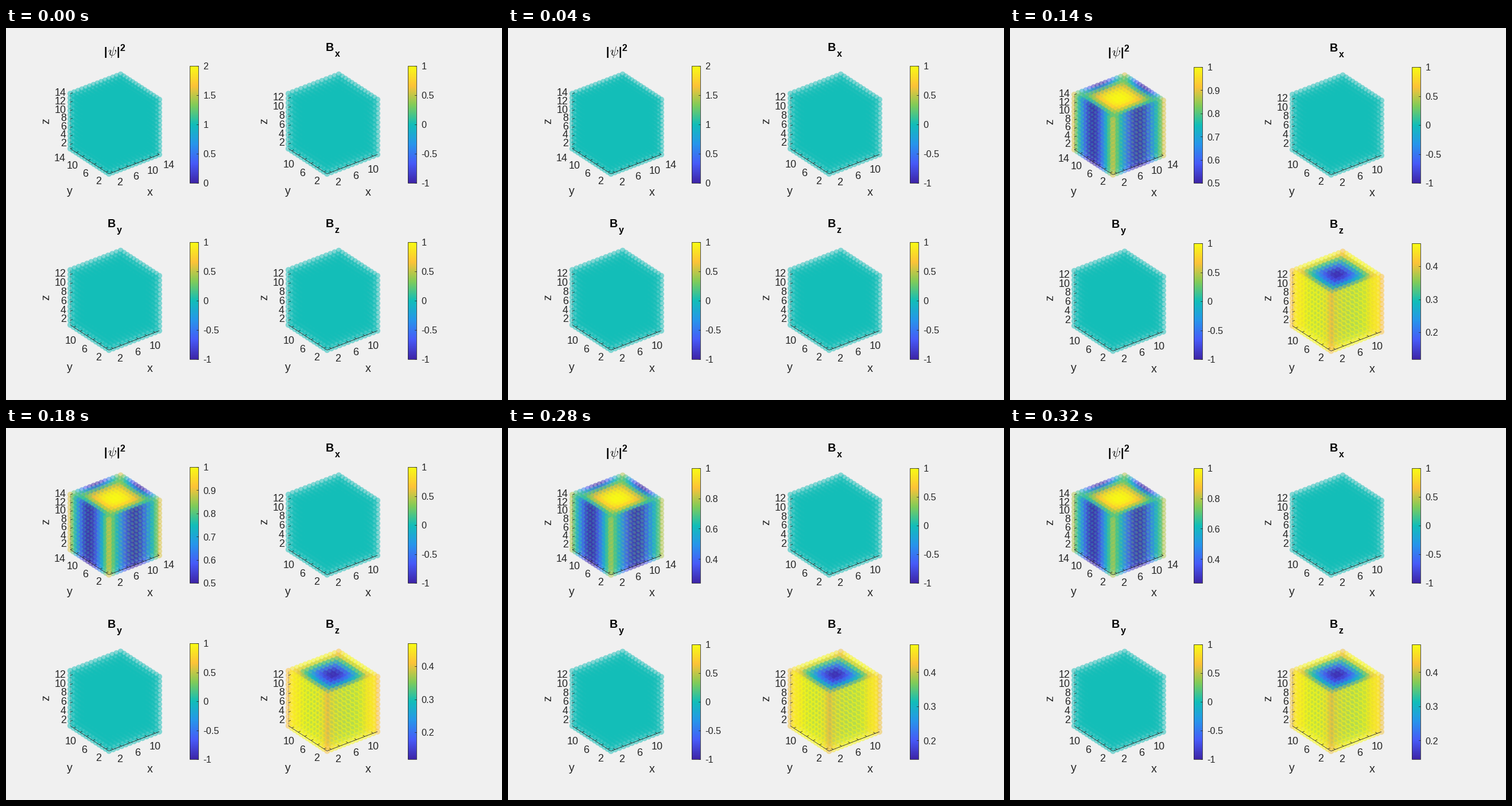
Write a matplotlib script that moves like this. It is 864 px wide and 648 px high and loops after 350 ms.

```python
import numpy as np
import matplotlib.pyplot as plt
from matplotlib.animation import FuncAnimation
from matplotlib.colors import LinearSegmentedColormap
from matplotlib.patches import Rectangle

W, H, DPI = 864, 648, 72
BG, GREY = "#f0f0f0", "#262626"
plt.rcParams["font.family"] = "Liberation Sans"
plt.rcParams["mathtext.fontset"] = "cm"

CMAP = LinearSegmentedColormap.from_list("scale", [
    "#3e26a8", "#475bf9", "#2796eb", "#12beb9", "#81cc59", "#fec338",
    "#f9fb15"])

# Orthographic view: screen vectors of the cube edges, front bottom corner
AZ, EL, EDGE = np.radians(37.5), np.radians(30), 110.5
EX = EDGE * np.array([np.cos(AZ), -np.sin(AZ) * np.sin(EL)])
EY = EDGE * np.array([-np.sin(AZ), -np.cos(AZ) * np.sin(EL)])
EZ = EDGE * np.array([0, -np.cos(EL)])
CORNER = np.array([179.3, 254])
RADIUS, ALPHA = 5.1, 0.5


def settle(step, rate, start, end):
    """Geometric approach to a steady state, beginning at step 1."""
    return end + (start - end) * rate ** max(step - 1, 0)


def lattice(n):
    """Grid indices of an n*n*n cube, farthest point first."""
    z, y, x = np.mgrid[:n, :n, :n].reshape(3, -1)
    nearness = (z * np.sin(EL)
                - np.cos(EL) * (x * np.sin(AZ) + y * np.cos(AZ)))
    order = np.argsort(nearness, kind="stable")
    return x[order], y[order], z[order]


GRIDS = {n: lattice(n) for n in (13, 14)}


def flat(n, step):
    return np.full(n ** 3, .5)


def density(n, step):
    x, y, _ = GRIDS[n]
    base = settle(step, .59, .075, .15)

    def wall(a, b):
        depth = np.minimum(a, n - 1 - a) * 2 / (n - 1)
        along = np.sin(np.pi * b / (n - 1))
        return (1 - depth) ** 3 * (base + (1 - base) * along)

    return np.clip(1 - wall(x, y) - wall(y, x), 0, 1)


def field_z(n, step):
    x, y, _ = GRIDS[n]
    sx, sy = (np.abs(np.sin(np.pi * a / (n - 1))) for a in (x, y))
    dip = np.minimum(sx, sy) * np.maximum(sx, sy) ** .3
    near = np.minimum(x, n - 1 - x) + np.minimum(y, n - 1 - y)
    corner = settle(step, .33, .12, .19) * np.exp(-near)
    return np.clip(1 - dip - corner, 0, 1)


fig = plt.figure(figsize=(W / DPI, H / DPI), dpi=DPI, facecolor=BG)
ax = fig.add_axes([0, 0, 1, 1])


def label(x, y, s, size=18, ha="center"):
    """Text whose digits are vertically centred on y."""
    ax.text(x, y + .36 * size, s, size=size, ha=ha, va="baseline",
            color=GREY)


def line(p, q, alpha):
    ax.plot([p[0], q[0]], [p[1], q[1]], color="black", lw=.8,
            solid_capstyle="butt", alpha=alpha, zorder=3)


def draw_cube(ox, oy, n, values, dy):
    origin = CORNER + (ox, oy + dy)
    unit = 1 / (n - 1)
    idx = np.array(GRIDS[n]).T * unit
    pts = origin + idx @ np.array([EX, EY, EZ])
    ax.scatter(pts[:, 0], pts[:, 1], s=(2 * RADIUS) ** 2, c=CMAP(values),
               alpha=ALPHA, linewidths=0, zorder=2)

    inner_x, inner_y = EX * .045, EY * .05
    line(origin, origin + EX, .85)
    line(origin, origin + EY, .75)
    line(origin + EY, origin + EY + EZ, .25)
    for v in range(2, n + 1, 2):
        t = (v - 1) * unit
        for p, d in ((origin + EX * t, inner_y), (origin + EY * t, inner_x),
                     (origin + EY + EZ * t, inner_x)):
            line(p, p + d, .8)
        label(ox + 105, oy + dy + 206.7 - 94.7 * t, str(v), ha="right")
    for v in range(2, n + 1, 4):
        t = (v - 2) * unit
        label(ox + 198 + 93 * t, oy + 267.6 - 32.7 * t + dy * .3, str(v))
        label(ox + 161 - 73 * t, oy + 266 - 44 * t + dy * .6, str(v))

    low = oy + dy * .6
    label(ox + 251, low + 284.5, "x", 19.8)
    label(ox + 111, low + 283, "y", 19.8)
    ax.text(ox + 70, low + 162.5, "z", size=19.8, color=GREY, rotation=90,
            ha="center", va="center")


def draw_bar(ox, oy, top, lo, hi):
    x0, x1, y0, y1 = ox + 320, ox + 335, oy + top, oy + 270
    ax.imshow(np.linspace(1, 0, 256)[:, None], cmap=CMAP, vmin=0, vmax=1,
              extent=(x0, x1, y1, y0), aspect="auto", zorder=2)
    ax.add_patch(Rectangle((x0, y0), x1 - x0, y1 - y0, fill=False,
                           ec=GREY, lw=.8, zorder=3))
    gap = next(g for g in (.05, .1, .2, .5) if (hi - lo) / g < 5.1)
    first, last = int(np.ceil(lo / gap - .01)), int(np.floor(hi / gap + .01))
    for k in range(first, last + 1):
        v = k * gap
        y = y1 - (v - lo) / (hi - lo) * (y1 - y0)
        ax.plot([x1 - 3, x1], [y, y], color=GREY, lw=.8, zorder=3)
        label(ox + 343.5, y + .5, f"{v:.2g}", 16.2, ha="left")


def draw_title(ox, oy, sub):
    bold = dict(weight="bold", color="black", ha="left", va="baseline")
    if sub:
        ax.text(ox + 177, oy + 40, "B", size=19.8, **bold)
        ax.text(ox + 192.5, oy + 50, sub, size=16, **bold)
        return
    for x in (170.5, 192.5):
        ax.text(ox + x, oy + 48.5, "|", size=19.8, **bold)
    ax.text(ox + 184.5, oy + 48.5, r"$\psi$", size=22, color="black",
            ha="center", va="baseline")
    ax.text(ox + 198.5, oy + 40, "2", size=16, **bold)


def draw(step):
    ax.clear()
    started = step > 0
    dy = settle(step, .59, 1.3, 1.9) * started
    top = round(settle(step, .59, 66, 71))
    psi, bz = (0, 2), (-1, 1)
    if started:
        psi = settle(step, .59, .7755, .1035), 1
        bz = settle(step, .33, .0585, .148), settle(step, .33, .443, .483)

    panels = [
        (0, 0, 14, "", density if started else flat, psi),
        (380, 0, 13, "x", flat, (-1, 1)),
        (0, 307, 13, "y", flat, (-1, 1)),
        (380, 307, 13, "z", field_z if started else flat, bz),
    ]
    for ox, oy, n, sub, field, limits in panels:
        draw_cube(ox, oy, n, field(n, step), dy)
        draw_bar(ox, oy, top, *limits)
        draw_title(ox, oy + dy * .6, sub)
    ax.set_xlim(0, W)
    ax.set_ylim(H, 0)
    ax.set_aspect("auto")
    ax.axis("off")
    return []


anim = FuncAnimation(fig, draw, frames=5, interval=70, repeat=True,
                     repeat_delay=0, cache_frame_data=False)
plt.show()
```
